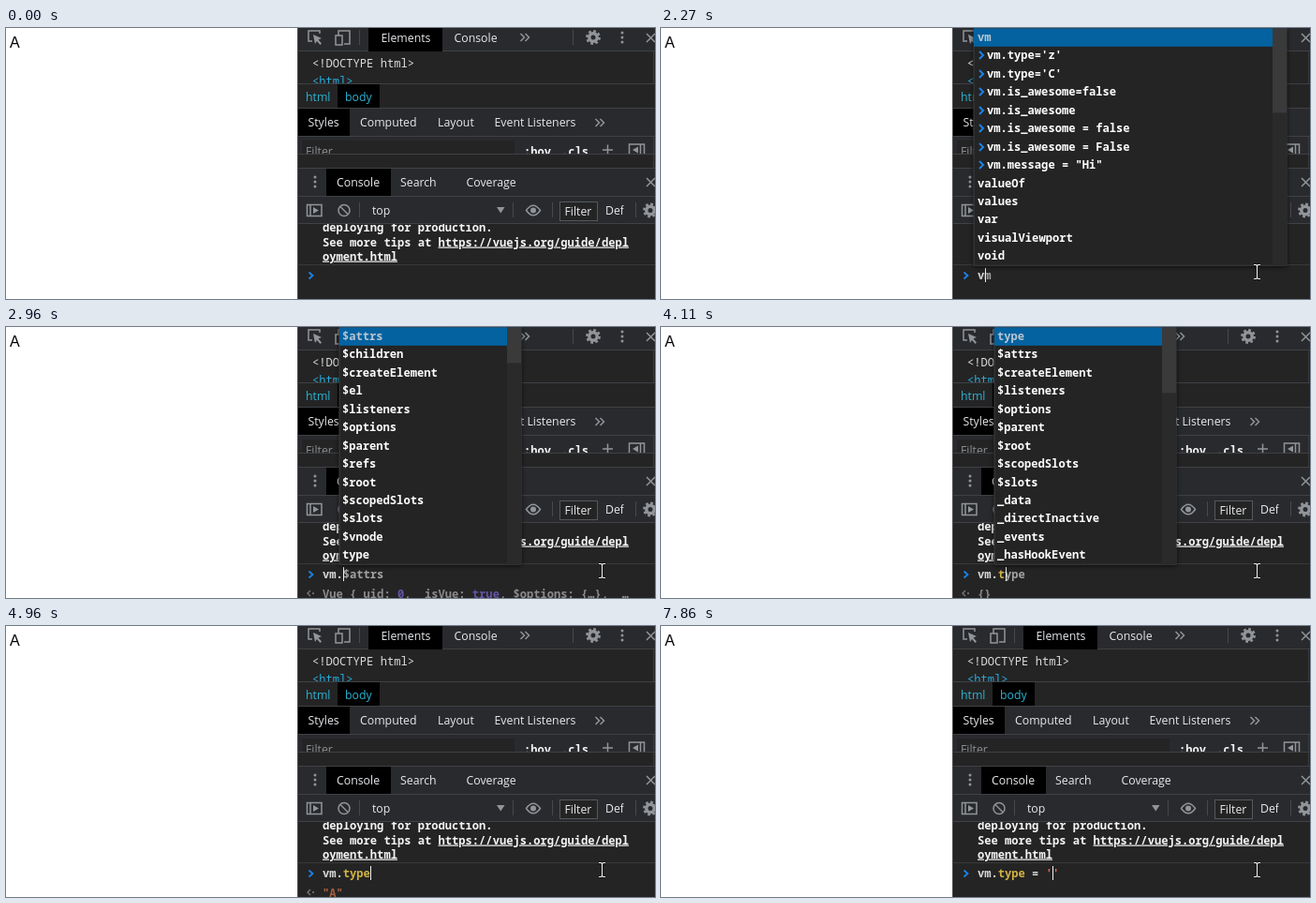
An HTML page for the animation above (8000 ms loop, 693 px wide and 289 px high).

```html
<!DOCTYPE html>
<html lang="en">
<head>
<meta charset="utf-8">
<title>Console session</title>
<style>
html, body { margin: 0; width: 100%; height: 100%; overflow: hidden; background: #fff; }
svg { display: block; width: 693px; height: 289px; }
text { white-space: pre; }
.ui { font: 12.3px "Open Sans", "Noto Sans", sans-serif; fill: #e8eaed; }
.mono { font: 12.12px "Noto Sans Mono", "DejaVu Sans Mono", monospace; fill: #f4f4f4; }
.b { font-weight: 600; }
.icon { fill: none; stroke: #919599; stroke-width: 1.5; }
.pop { filter: drop-shadow(0 1px 2px rgba(0,0,0,.7)); }
</style>
</head>
<body>
<svg viewBox="0 0 693 289">
  <defs>
    <clipPath id="tree"><rect x="311" y="25" width="382" height="34"/></clipPath>
    <clipPath id="filters"><rect x="311" y="116" width="382" height="18"/></clipPath>
    <clipPath id="log"><rect x="311" y="209" width="382" height="80"/></clipPath>
    <clipPath id="level"><rect x="636" y="180" width="23.500" height="28"/></clipPath>
    <path id="beam" d="M-3.500-7.500H-1.200L0-6.500L1.200-7.500H3.500M0-6.500V6.500M-3.500 7.500H-1.200L0 6.500L1.200 7.500H3.500" fill="none"/>
  </defs>
  <rect width="693" height="289" fill="#fff"/>
  <text x="4" y="21" font-size="16" font-family="'Liberation Sans', Arial, sans-serif">A</text>
  <g id="panel"></g>
  <g id="prompt"></g>
  <g id="popup"></g>
  <g id="mouse">
    <use href="#beam" stroke="#111" stroke-width="2.600"/>
    <use href="#beam" stroke="#f2f2f2" stroke-width="1.100"/>
  </g>
</svg>
<script>
const $ = id => document.getElementById(id);
const esc = s => s.replace(/&/g, '&amp;').replace(/</g, '&lt;');
const rect = (x, y, w, h, fill, more = '') =>
  `<rect x="${x}" y="${y}" width="${w}" height="${h}" fill="${fill}" ${more}/>`;
const text = (x, y, s, cls, fill) =>
  `<text x="${x}" y="${y}" class="${cls}"${fill ? ` style="fill:${fill}"` : ''}>${esc(s)}</text>`;
const ui = (x, y, s, fill) => text(x, y, s, 'ui', fill);
const mono = (x, y, s, fill) => text(x, y, s, 'mono b', fill);
const icon = (d, more = '') => `<path class="icon" d="${d}" ${more}/>`;
const span = (s, fill) => `<tspan fill="${fill}">${esc(s)}</tspan>`;
const line = (x, y, parts) => `<text x="${x}" y="${y}" class="mono b">${parts.join('')}</text>`;
const clip = (id, body) => `<g clip-path="url(#${id})">${body}</g>`;

const BG = '#242424', BAR = '#292a2d', EDGE = '#3f4144';
const GREY = '#8c8c8c', VIOLET = '#6654a8', BLUE = '#1b83e8', CYAN = '#2bb3d2';

const gear = (x, y) =>
  `<circle class="icon" cx="${x}" cy="${y}" r="6.600" style="stroke-width:2.600" stroke-dasharray="2.700 2.484"/>` +
  `<circle class="icon" cx="${x}" cy="${y}" r="4.200" style="stroke-width:3.400"/>`;
const dots = (x, y) => [-5, 0, 5].map(d => `<circle cx="${x}" cy="${y + d}" r="1.500" fill="#919599"/>`).join('');
const cross = (x, y) => icon(`M${x - 4} ${y - 4}l9 9m0-9l-9 9`);
const more = (x, y) => icon(`M${x} ${y - 4}l4 4l-4 4m5-8l4 4l-4 4`);
const sep = (x, y) => rect(x, y, 1, 16, '#47494c');
const edge = y => rect(311, y, 382, 1, EDGE);

function panel() {
  return [
    rect(311, 0, 382, 289, BG),
    // main tabs
    rect(311, 0, 382, 24, BAR), edge(24), rect(387, 0, 79, 25, '#000'),
    icon('M335 6V3H323V14H327'),
    '<path d="M328 7l9 4l-3.500 1.500l3.500 4l-1.500 1.500l-3.500-4l-2 3z" fill="#919599"/>',
    icon('M355 8V3H367V17H361M352 8H359V18H352Z'),
    sep(377, 2), ui(400.5, 15, 'Elements'), ui(478.5, 15, 'Console'), more(549.5, 10),
    sep(605, 2), gear(627, 10), dots(658, 10), cross(688, 10),
    // document tree
    clip('tree', text(327, 42, '<!DOCTYPE html>', 'mono', '#dcdcdc') + text(327, 61, '<html>', 'mono', '#2aa9d8')),
    rect(691, 25, 1, 34, '#3a3a3a'),
    // breadcrumbs
    edge(59), rect(311, 60, 382, 25, BG), rect(354, 60, 45, 25, '#000'),
    ui(320, 78, 'html', CYAN), ui(362, 78, 'body', CYAN), edge(85),
    // style tabs
    rect(311, 86, 382, 29, BAR), rect(312, 86, 55, 29, '#000'), edge(115),
    ui(322.5, 105, 'Styles'), ui(378, 105, 'Computed'), ui(461, 105, 'Layout'),
    ui(521.5, 105, 'Event Listeners'), more(629.5, 101),
    // style filter
    rect(311, 116, 382, 18, BAR),
    clip('filters', rect(316, 120, 227, 20, BG) + ui(320, 136, 'Filter', '#8d9094') +
      mono(553, 136, ':hov') + mono(593, 136, '.cls') +
      icon('M642.5 124.500V135.500M637 130H648M665.500 124H681.500V136H665.500ZM677.500 124V136') +
      '<path d="M675 126.500V133.500L669 130Z" fill="#919599"/>'),
    edge(134), rect(691, 116, 1, 33, '#3a3a3a'),
    // drawer tabs
    edge(149), rect(311, 150, 382, 29, BAR), rect(342, 150, 69, 29, '#000'), edge(179),
    dots(330, 164), ui(353, 169, 'Console'), ui(421, 169, 'Search'), ui(491.5, 169, 'Coverage'), cross(688, 164),
    // console toolbar
    rect(311, 180, 382, 28, BAR), edge(208),
    icon('M321.500 188.500H337V200.500H321.500ZM325 188.500V200.500'),
    '<path d="M328 191V198L334 194.500Z" fill="#919599"/>',
    '<circle class="icon" cx="361" cy="194.500" r="6"/>', icon('M357 190.500l8 8'),
    sep(377, 186), ui(391, 199, 'top'), '<path d="M524 191H532.500L528.250 197.500Z" fill="#919599"/>',
    sep(541, 186), icon('M555.500 194.500Q563 184 570.500 194.500Q563 205 555.500 194.500Z'),
    '<circle cx="563" cy="194.500" r="3" fill="#919599"/>', sep(583, 186),
    rect(591.5, 185.5, 40, 20, BG, 'stroke="#55585c"'), ui(596.5, 200, 'Filter'),
    clip('level', ui(640, 199, 'Default levels')), sep(672, 186), gear(688, 194.5),
    // message
    clip('log', mono(338, 217, 'deploying for production.') +
      '<text x="338" y="232.500" class="mono b">See more tips at <tspan text-decoration="underline">https://vuejs.org/guide/depl</tspan></text>' +
      '<text x="338" y="247.500" class="mono b" text-decoration="underline">oyment.html</text>'),
    rect(311, 252, 382, 1, '#38393b'),
    `<path d="M323.500 260.500l4 3.500l-4 3.500" fill="none" stroke="${BLUE}" stroke-width="1.800"/>`,
    rect(311, 0, 1, 289, '#4a4c4f')
  ].join('');
}

const results = {
  vue: [span('Vue {_uid: ', GREY), span('0', VIOLET), span(', _isVue: ', GREY), span('true', VIOLET),
    span(', $options: {…},  …', GREY)],
  empty: [span('{}', GREY)],
  str: [span('"A"', '#a85f40')]
};

const ROW = 19.45, BOTTOM = 253.25;
const past = ["vm.type='z'", "vm.type='C'", 'vm.is_awesome=false', 'vm.is_awesome',
  'vm.is_awesome = false', 'vm.is_awesome = False', 'vm.message = "Hi"'].map(s => '>' + s);
const words = s => s.split(' ');
const lists = {
  v: { x: 334, w: 334, thumb: 90, items: ['vm', ...past, ...words('valueOf values var visualViewport void')] },
  vm: { x: 334, w: 210, items: ['vm', ...past] },
  all: { x: 356, w: 194, thumb: 38, items: words('$attrs $children $createElement $el $listeners $options $parent $refs $root $scopedSlots $slots $vnode type') },
  t: { x: 356, w: 194, thumb: 70, items: words('type $attrs $createElement $listeners $options $parent $root $scopedSlots $slots _data _directInactive _events _hasHookEvent') },
  ty: { x: 356, w: 194, items: words('type $destroy _isBeingDestroyed _isDestroyed hasOwnProperty propertyIsEnumerable') }
};

function popup(list) {
  if (!list) return '';
  const { x, w, thumb, items } = list, h = items.length * ROW, top = BOTTOM - h;
  const rows = items.map((s, i) => {
    const y = Math.round(top + i * ROW + 13.5);
    if (s[0] !== '>') return mono(x + (x < 350 ? 4 : 3), y, s, i ? '#fff' : '#b9c6d1');
    return `<path d="M${x + 6} ${y - 8}l4 4l-4 4" fill="none" stroke="${BLUE}" stroke-width="2"/>` +
      mono(x + 14, y, s.slice(1), '#fff');
  });
  const bar = thumb ? rect(x + w - 15, top, 15, h, '#2a2a2a') + rect(x + w - 15, top, 15, thumb, '#3a3a3a') : '';
  return `<g class="pop">${rect(x, top, w, h, BG, 'stroke="#3c3e40"')}</g>` +
    rect(x, top, w, ROW, '#0462a0') + bar + rows.join('');
}

// Splits the typed code into object, property, operator and string
function paint(code, ghost) {
  const [, obj, prop, op, str] = code.match(/^(\w*\.?)(\w*)([ =]*)(.*)$/);
  return [span(obj, '#d6d6d6'), span(prop, '#d2b344'), span(op, '#d6d6d6'), span(str, '#e2694d'), span(ghost, '#a3a3a3')];
}

// Each step changes only the fields it names
const steps = [
  [0, { code: '', ghost: '', caret: -1, on: true, list: '', result: '' }],
  [1060, { caret: 0 }],
  [1580, { on: false }],
  [2040, { on: true }],
  [2270, { code: 'v', ghost: 'm', caret: 1, list: 'v' }],
  [2430, { code: 'vm', ghost: '', caret: 2, list: 'vm', result: 'vue' }],
  [2890, { code: 'vm.', caret: 3, list: '' }],
  [2960, { ghost: '$attrs', list: 'all' }],
  [3110, { result: 'empty' }],
  [3500, { on: false }],
  [4030, { code: 'vm.t', ghost: '', caret: 4, on: true }],
  [4110, { ghost: 'ype', list: 't' }],
  [4260, { code: 'vm.ty', ghost: 'pe', caret: 5, list: 'ty', result: 'str' }],
  [4800, { on: false }],
  [4960, { code: 'vm.type', ghost: '', caret: 7, on: true, list: '' }],
  [5490, { code: 'vm.type ', caret: 8 }],
  [5650, { code: 'vm.type =', caret: 9 }],
  [5720, { result: '' }],
  [5790, { code: 'vm.type = ', caret: 10 }],
  [6250, { on: false }],
  [6790, { on: true }],
  [7160, { code: "vm.type = '", caret: 11 }],
  [7320, { code: "vm.type = ''", caret: 12 }],
  [7860, { caret: 11 }]
];
const track = [[130, 624, 271], [200, 637, 261], [270, 647, 251], [810, 641, 256], [890, 636.5, 260]];

function prompt(s) {
  let out = line(338, 268, paint(s.code, s.ghost));
  if (s.caret >= 0 && s.on) out += rect(Math.floor(339 + 7.25 * s.caret), 256, 1, 15, '#f0f0f0');
  if (s.result) {
    out += '<path d="M325 281l-3 3l3 3" fill="none" stroke="#777" stroke-width="1.400"/>' +
      '<circle cx="328" cy="284" r="1.100" fill="#777"/>' + line(338, 288.5, results[s.result]);
  }
  return out;
}

let shown = -1;
function draw(t) {
  const done = steps.filter(s => s[0] <= t);
  if (done.length !== shown) {
    shown = done.length;
    const state = Object.assign({}, ...done.map(s => s[1]));
    $('prompt').innerHTML = prompt(state);
    $('popup').innerHTML = popup(lists[state.list]);
  }
  const at = track.filter(p => p[0] <= t).pop();
  $('mouse').setAttribute('visibility', at ? 'visible' : 'hidden');
  if (at) $('mouse').setAttribute('transform', `translate(${at[1]} ${at[2]})`);
}

$('panel').innerHTML = panel();
const start = performance.now();
function tick() {
  draw((performance.now() - start) % 8000);
  requestAnimationFrame(tick);
}
tick();
</script>
</body>
</html>
```
